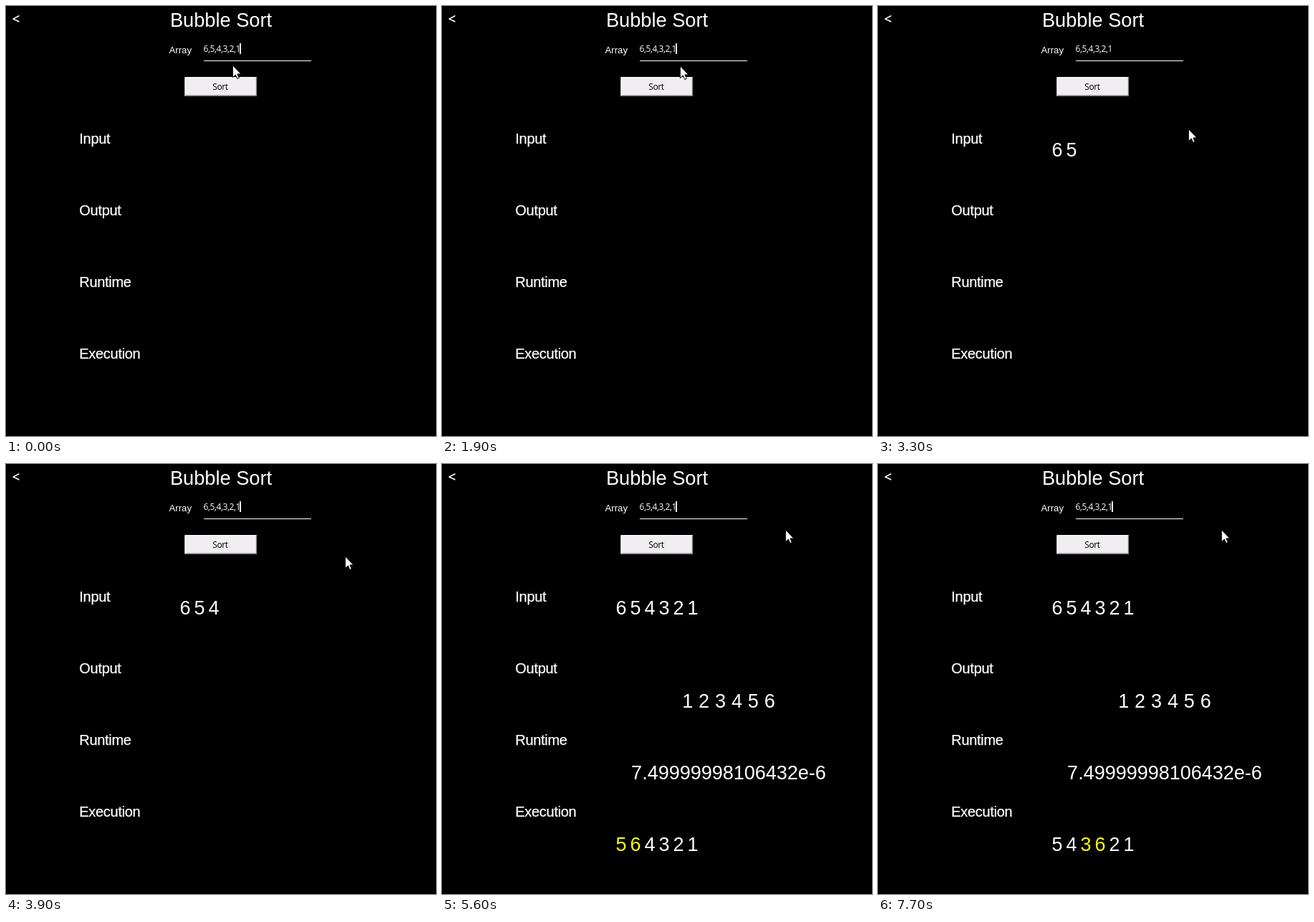
An HTML page for the animation above (8 s loop, 600 by 600 pixels).

```html
<!DOCTYPE html>
<html lang="en">
<head>
<meta charset="utf-8">
<title>Bubble Sort</title>
<style>
  html, body { margin: 0; width: 100%; height: 100%; overflow: hidden; background: #000; }
  svg { display: block; width: 100vw; height: 100vh; }
  text { font: 27px "Liberation Sans", Arial, sans-serif; fill: #fff; white-space: pre; }
  .mid { text-anchor: middle; }
  .label { font-size: 20px; letter-spacing: -.3px; stroke: #fff; stroke-width: .25px; }
  .ui { font: 12px "Open Sans", "Noto Sans", sans-serif; letter-spacing: -.4px; }
  .hot { fill: #ff0; }
</style>
</head>
<body>
<svg viewBox="0 0 600 600">
  <rect width="600" height="600"/>
  <text class="ui" x="8.5" y="24.5" style="font-size:19px;font-weight:600">&lt;</text>
  <text class="mid" x="300" y="29" style="font-size:27.2px">Bubble Sort</text>
  <text x="227.5" y="66" style="font-size:13.2px">Array</text>
  <text class="ui" x="275.5" y="64">6,5,4,3,2,1</text>
  <rect id="caret" x="326" y="52" width="2" height="15" fill="#fff"/>
  <rect x="276" y="76" width="150" height="1" fill="#fff"/>

  <rect x="249.5" y="99" width="100.5" height="27" fill="#f0eef0"/>
  <path id="lowEdge" d="M250 125.3H349.5V99.5" fill="none" stroke="#777" stroke-width="1.4"/>
  <path id="highEdge" d="M250 125V99.5H349" fill="none" stroke="#fff"/>
  <text class="ui mid" id="caption" x="299" y="117" style="fill:#000">Sort</text>

  <text class="label" x="102.3" y="192">Input</text>
  <text class="label" x="102.3" y="292">Output</text>
  <text class="label" x="102.3" y="392">Runtime</text>
  <text class="label" x="102.3" y="492">Execution</text>

  <g id="input"></g>
  <g id="result">
    <text class="mid" x="400" y="340" style="word-spacing:.4px">1 2 3 4 5 6</text>
    <text class="mid" x="400" y="440">7.49999998106432e-6</text>
    <g id="execution"></g>
  </g>
  <path id="pointer" d="M-.7 -.3V16.7L3.3 13L5.7 18.5L8.3 17.4L5.9 11.9H11Z"
        fill="#fff" stroke="#000"/>
</svg>
<script>
const LOOP = 8000, TICK = 100, CLICK = 2600, DIGIT_STEP = 500, SWAP_START = 5600, SWAP_STEP = 1000;
const numbers = [6, 5, 4, 3, 2, 1];
const $ = id => document.getElementById(id);

// Each move is an arc from the previous stop, bent towards `via`.
const moves = [
  { from: 100, until: 900, via: [246, 248], to: [176, 414] },
  { from: 1000, until: 1900, via: [254, 249], to: [333, 84] },
  { from: 1900, until: 2500, via: [326, 98], to: [320, 109] },
  { from: 2700, until: 4400, via: [468, 243], to: [480, 92] }
];

function pointerAt(t) {
  let pos = [317, 83];
  for (const { from, until, via, to } of moves) {
    if (t <= from) break;
    const k = Math.min(1, (t - from) / (until - from));
    const u = 1 - (1 - k) ** 1.6;
    pos = pos.map((p, i) => p * (1 - u) ** 2 + via[i] * 2 * u * (1 - u) + to[i] * u * u);
  }
  return pos.map(Math.round);
}

// The caret blinks freely until the click, then only when the window refreshes.
function caretOn(t) {
  if (t < CLICK) return (t + 400) % 900 < 600;
  let on = true, since = 2300;
  for (let s = CLICK; s <= t; s += s < SWAP_START ? DIGIT_STEP : SWAP_STEP) {
    if (s - since >= (on ? 600 : 300)) {
      on = !on;
      since = s;
    }
  }
  return on;
}

const digitRow = (digits, y, hot = -9) => digits.map((d, i) =>
  `<text class="mid${i === hot || i === hot + 1 ? ' hot' : ''}" x="${250 + 20 * i}" y="${y}">${d}</text>`
).join('');

function swapped(pass) {
  const a = numbers.slice();
  for (let i = 0; i <= pass; i++) [a[i], a[i + 1]] = [a[i + 1], a[i]];
  return a;
}

function draw(t) {
  const shown = Math.max(0, Math.floor((t - CLICK) / DIGIT_STEP) + 1);
  $('input').innerHTML = digitRow(numbers.slice(0, shown), 210);

  const pass = Math.floor((t - SWAP_START) / SWAP_STEP);
  $('result').style.display = pass < 0 ? 'none' : '';
  $('execution').innerHTML = pass < 0 ? '' : digitRow(swapped(pass), 540, pass);

  $('caret').style.display = caretOn(t) ? '' : 'none';
  const pressed = t >= CLICK - 200 && t < CLICK;
  $('lowEdge').setAttribute('stroke', pressed ? '#fff' : '#777');
  $('highEdge').setAttribute('stroke', pressed ? '#777' : '#fff');
  $('caption').setAttribute('transform', pressed ? 'translate(1 1)' : '');
  $('pointer').setAttribute('transform', `translate(${pointerAt(t)})`);
}

const start = performance.now();
function frame() {
  const t = (performance.now() - start) % LOOP;
  draw(Math.floor(t / TICK) * TICK);
  requestAnimationFrame(frame);
}
frame();
</script>
</body>
</html>
```
